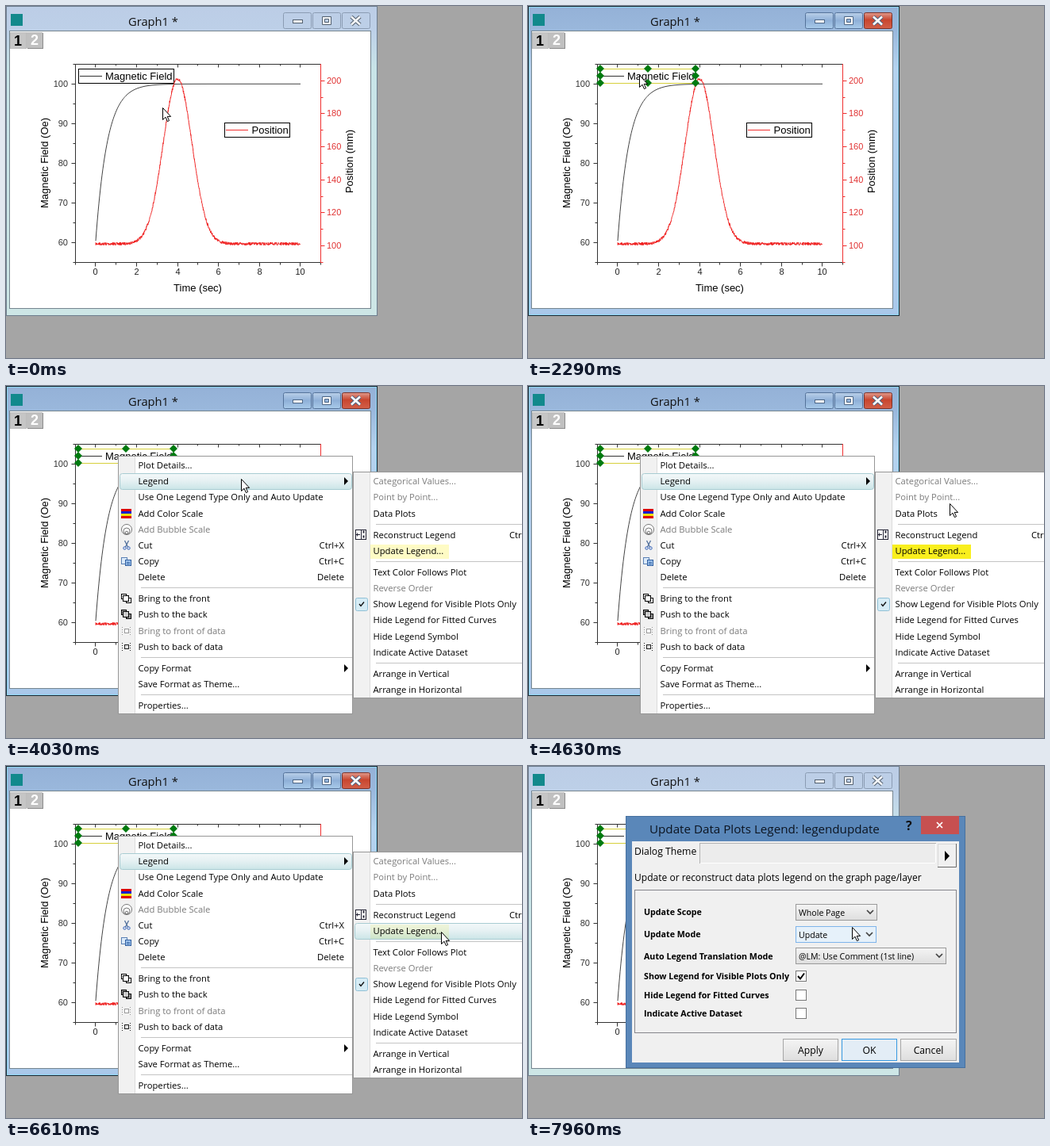
Animation of 650 by 444 pixels, one loop 7990 ms. Source, as an HTML page:

```html
<!DOCTYPE html>
<html lang="en">
<head>
<meta charset="utf-8">
<title>Updating a graph legend</title>
<style>
  html, body { margin: 0; width: 100%; height: 100%; overflow: hidden; background: #a5a5a5; }
  svg { display: block; width: 650px; height: 444px; }
  text { font-family: "Open Sans", "Noto Sans", sans-serif; font-size: 11.25px; white-space: pre; }
  .plot text { font-family: "Liberation Sans", Arial, sans-serif; font-size: 13px; }
  .plot .tick { font-size: 11px; }
  .plot .tab { font-size: 18px; font-weight: bold; }
  .bold { font-size: 10.7px; font-weight: 700; }
  .combo { font-size: 10.6px; }
  .button { font-size: 12.2px; }
  .mid { text-anchor: middle; }
  .end { text-anchor: end; }
  #mark { mix-blend-mode: multiply; }
</style>
</head>
<body>
<svg id="stage" viewBox="0 0 650 444" xmlns="http://www.w3.org/2000/svg">
  <defs>
    <linearGradient id="idle" x2="0" y2="1">
      <stop offset="0" stop-color="#bccde6"/><stop offset=".08" stop-color="#bdd0e8"/>
      <stop offset=".2" stop-color="#c8e4e8"/><stop offset="1" stop-color="#cde6e6"/>
    </linearGradient>
    <linearGradient id="active" x2="0" y2="1">
      <stop offset="0" stop-color="#94b1d7"/><stop offset=".08" stop-color="#9ab8dc"/>
      <stop offset=".2" stop-color="#b4d2ee"/><stop offset="1" stop-color="#a9c8ea"/>
    </linearGradient>
    <linearGradient id="blueButton" x2="0" y2="1">
      <stop offset="0" stop-color="#b9cfe8"/><stop offset=".5" stop-color="#8fb0d8"/><stop offset="1" stop-color="#a9cbea"/>
    </linearGradient>
    <linearGradient id="redButton" x2="0" y2="1">
      <stop offset="0" stop-color="#e09a8c"/><stop offset=".45" stop-color="#c9462f"/><stop offset="1" stop-color="#d2604a"/>
    </linearGradient>
    <linearGradient id="hover" x2="0" y2="1">
      <stop offset="0" stop-color="#f3f8f9"/><stop offset=".45" stop-color="#e6f1f3"/><stop offset="1" stop-color="#cbe5e7"/>
    </linearGradient>
    <linearGradient id="face" x2="0" y2="1">
      <stop offset="0" stop-color="#f4f4f4"/><stop offset="1" stop-color="#dedede"/>
    </linearGradient>
  </defs>
</svg>
<script>
const LOOP = 7990;
const stage = document.getElementById('stage');
const $ = id => document.getElementById(id);

const rect = (x, y, w, h, fill, stroke = 'none', more = '') =>
  `<rect x="${x}" y="${y}" width="${w}" height="${h}" fill="${fill}" stroke="${stroke}" ${more}/>`;
// Box with a crisp one pixel border; x, y, w, h are outer sizes
const box = (x, y, w, h, fill, stroke, more) => rect(x + .5, y + .5, w - 1, h - 1, fill, stroke, more);
const path = (d, stroke, fill = 'none', more = '') =>
  `<path d="${d}" stroke="${stroke}" fill="${fill}" ${more}/>`;
const ring = (x, y, r, stroke, fill = 'none') =>
  `<circle cx="${x}" cy="${y}" r="${r}" fill="${fill}" stroke="${stroke}"/>`;
const text = (x, y, s, cls = '', fill = '#000', more = '') =>
  `<text x="${x}" y="${y}" class="${cls}" fill="${fill}" ${more}>${s}</text>`;
const group = (id, body, more = '') => `<g id="${id}" ${more}>${body}</g>`;

function chrome(on) {
  const glyph = on ? '#fff' : '#f4f6f8', edge = on ? '#4d6685' : '#53606f';
  const button = x => box(x, 8, 36, 21, on ? 'url(#blueButton)' : 'none', on ? '#55739a' : '#8b9cb3', 'rx="2"');
  const cross = 'M435 13.5l11 10M446 13.5l-11 10';
  return box(0, 0, 468, 391, `url(#${on ? 'active' : 'idle'})`, on ? '#1c2630' : '#6d7d8e')
    + (on ? box(1, 1, 466, 389, 'none', '#8fd8f4') : '')
    + rect(6, 10, 15, 15, '#12898c')
    + text(154, 25, 'Graph1 *', '', '#111', 'style="font-size:14.7px"')
    + button(349) + button(386)
    + box(423, 8, 36, 21, on ? 'url(#redButton)' : 'none', on ? '#7c3128' : '#8b9cb3', 'rx="2"')
    + rect(361.5, 17.5, 12, 4, glyph, edge)
    + path('M398.5 13.5h11v10h-11zM401.5 16.5h5v4h-5z', edge, glyph, 'fill-rule="evenodd"')
    + path(cross, edge, 'none', 'stroke-width="4.6"') + path(cross, glyph, 'none', 'stroke-width="2.6"')
    + box(4, 31, 456, 351, '#fff', '#75858f');
}

function curves() {
  let seed = 7;
  const noise = () => (seed = seed * 16807 % 2147483647) / 2147483647 * 3.6 - 1.8;
  const sample = (step, f) => {
    let d = '';
    for (let x = 0; x <= 258; x += step) d += `${d ? 'L' : 'M'}${(113 + x).toFixed(2)} ${f(x / 25.8).toFixed(2)}`;
    return d;
  };
  return path(sample(1, t => 98.3 + 198 * Math.exp(-t / .57)), '#444')
    + path(sample(.258, t => 300 - 208 * Math.exp(-((t - 4) ** 2)) + noise()), '#f02020');
}

function axes() {
  let dark = 'M87.5 323.5V73.5H396.5M87.5 323.5H396.5', red = 'M396.5 73V324', out = '';
  for (let i = 0; i <= 12; i++) {
    const x = Math.floor(87 + i * 25.8) + .5, major = i % 2;
    dark += `M${x} 323.5v${major ? 5 : 3}M${x} 73.5v${major ? 4 : 2}`;
    if (major) out += text(x, 339, i - 1, 'tick mid', '#222');
  }
  for (let i = 0; i <= 10; i++) {
    const y = 73.5 + i * 25;
    dark += `M87.5 ${y}h${i % 2 ? -5 : -3}`;
    if (i % 2) out += text(78, y + 3.5, 105 - i * 5, 'tick end', '#333');
  }
  for (let i = 0; i <= 11; i++) {
    const y = Math.round(302 - (i - 1) * 20.83) + .5, major = i % 2;
    red += `M396.5 ${y}h${major ? 5 : 3}`;
    if (major) out += text(404, y + 3.5, 90 + i * 10, 'tick', '#e03030');
  }
  return path(dark, '#333') + path(red, '#f03030') + out;
}

function plot() {
  const diamond = (x, y) => path(`M${x - 5} ${y}l5 -5l5 5l-5 5z`, 'none', '#007a10');
  const spots = [91, 151, 211].flatMap(x => [79, 88, 97].map(y => [x, y])).filter(p => p[0] != 151 || p[1] != 88);
  return box(5, 33, 21, 21, '#c6c6c6', '#bdbdbd') + text(10, 50, 1, 'tab')
    + rect(27, 34, 20, 20, '#8c8c8c') + rect(26, 33, 20, 20, '#c0c0c0') + text(31, 49, 2, 'tab', '#fff')
    + axes()
    + text(0, 0, 'Magnetic Field (Oe)', 'mid', '#000', 'transform="translate(52.5 198) rotate(-90)"')
    + text(0, 0, 'Position (mm)', 'mid', '#000', 'transform="translate(436.5 196) rotate(-90)"')
    + text(241.5, 360, 'Time (sec)', 'mid')
    + box(91, 79, 121, 19, '#fff', '#000', 'id="frame"')
    + box(275, 147, 83, 19, '#fff', '#000')
    + curves()
    + path('M93 88.5H121', '#333') + text(125, 92.5, 'Magnetic Field')
    + path('M277 156.5H305', '#f03030') + text(309.5, 160.5, 'Position')
    + group('handles', path('M91 79.5H212M91 97.5H212', '#d6d03c')
      + spots.map(p => diamond(...p)).join(''));
}

const GREY = '#7b7b7b';
// Rows: centre y, label, shortcut, disabled
const mainRows = [
  [100, 'Plot Details...'], [120, 'Legend', '>'], [140, 'Use One Legend Type Only and Auto Update'],
  [161, 'Add Color Scale'], [181, 'Add Bubble Scale', '', 1], [201, 'Cut', 'Ctrl+X'],
  [221, 'Copy', 'Ctrl+C'], [241, 'Delete', 'Delete'], [268, 'Bring to the front'],
  [288, 'Push to the back'], [309, 'Bring to front of data', '', 1], [329, 'Push to back of data'],
  [356, 'Copy Format', '>'], [376, 'Save Format as Theme...'], [403, 'Properties...']
];
const subRows = [
  [120, 'Categorical Values...', '', 1], [140, 'Point by Point...', '', 1], [161, 'Data Plots'],
  [188, 'Reconstruct Legend'], [208, 'Update Legend...'], [235, 'Text Color Follows Plot'],
  [255, 'Reverse Order', '', 1], [275, 'Show Legend for Visible Plots Only'],
  [295, 'Hide Legend for Fitted Curves'], [316, 'Hide Legend Symbol'],
  [336, 'Indicate Active Dataset'], [363, 'Arrange in Vertical'], [383, 'Arrange in Horizontal']
];

function menu(id, x, y, w, h, rows, lines, extra) {
  const tip = (s, cy) => s == '>'
    ? path(`M${x + 285} ${cy - 5}v10l5 -5z`, 'none', '#000')
    : text(x + 285, cy + 4, s || '', 'end');
  return group(id, box(x, y, w, h, '#fff', '#979797')
    + rect(x + 1, y + 1, 20, h - 2, '#f1f1f1') + path(`M${x + 21.5} ${y + 1}v${h - 2}`, '#dcdcdc')
    + lines.map(v => path(`M${x + 29} ${v + .5}H${x + w - 1}`, '#c4c4c4')).join('')
    + box(x + 2, 0, w - 3, 21, 'url(#hover)', '#a8ccd2', `id="${id}Hover" rx="3"`)
    + extra
    + rows.map(([cy, s, key, off]) => text(x + 25.5, cy + 4, s, '', off ? GREY : '#000') + tip(key, cy)).join(''));
}

function icons() {
  const stripes = ['#e00000', '#1020d0', '#f0e000', '#e00000'];
  const stack = (y, outer, inner) => box(145, y - 6, 7, 7, outer, '#000') + box(151, y - 1, 7, 7, outer, '#000')
    + box(147, y - 4, 8, 8, inner, '#000');
  const dotted = (y, c, fill) => path(`M146.5 ${y - 5}v11M156.5 ${y - 5}v11`, c, 'none', 'stroke-dasharray="1 2"')
    + box(149, y - 3, 6, 6, fill, c);
  return stripes.map((c, i) => rect(145, 155 + i * 3, 13, 3, c)).join('')
    + ring(152, 181, 6.5, '#777', '#fff') + ring(152, 183, 4, '#777') + ring(152, 185, 1.8, '#777')
    + path('M149.5 195l4 8M154.5 195l-4 8', '#52709c', 'none', 'stroke-width="1.3"')
    + ring(149.5, 204.5, 1.7, '#2458b8') + ring(154.5, 204.5, 1.7, '#2458b8')
    + box(145, 216, 8, 9, '#dcebfa', '#5a80b4') + box(150, 219, 8, 8, '#9fc4ee', '#315f9f')
    + path('M152 222.5h4M152 224.5h4', '#315f9f')
    + stack(268, '#fff', '#fff') + stack(288, '#999', '#ccc')
    + dotted(309, '#999', '#fff') + dotted(329, '#222', '#ddd');
}

const subExtra = box(440, 181, 14, 13, '#fff', '#223') + path('M447.5 181v13M441 187.5h5M442.5 185.5v4', '#223')
  + path('M449.5 184h2M449.5 190h2', '#223', 'none', 'stroke-width="3"')
  + box(440, 267, 16, 17, '#d6ecf5', '#8fc0d6', 'rx="2"')
  + path('M445 275l2 2.5l4 -5', '#111', 'none', 'stroke-width="1.4"')
  + text(634, 192, 'Ctrl+L');

function dialog() {
  const label = (y, s) => text(146, y + 4, s, 'bold');
  const combo = (y, w, s, id = '') => box(337, y, w, 21, 'url(#face)', '#9a9a9a', id)
    + text(341, y + 14.5, s, 'combo')
    + path(`M${337 + w - 13} ${y + 8}l4 4l4 -4`, '#444', 'none', 'stroke-width="1.7"');
  const check = (y, on) => box(337, y - 7, 14, 14, '#fff', '#777')
    + (on ? path(`M340 ${y}l3 3.5l5 -7`, '#000', 'none', 'stroke-width="2"') : '');
  const button = (x, w, s, main) => box(x, 344, w, 28, main ? '#e3edf6' : 'url(#face)', main ? '#3899e0' : '#a6a6a6')
    + text(x + w / 2, 362.5, s, 'button mid');
  return group('dialog', box(123, 63, 428, 318, '#5a87b9', '#47719f')
    + text(153, 85, 'Update Data Plots Legend: legendupdate', '', '#0c1420', 'style="font-size:15.2px"')
    + text(476, 81, '?', '', '#111', 'style="font-size:16px;font-weight:700"')
    + rect(495, 63, 48, 23, '#c75050') + path('M515 71l7 7M522 71l-7 7', '#fff', 'none', 'stroke-width="1.7"')
    + rect(131, 95, 412, 279, '#f0f0f0')
    + text(134, 112, 'Dialog Theme', '', '#000', 'style="font-size:12.2px"')
    + box(216, 97, 298, 26, '#ececec', '#b4b4b4') + path('M217 122.5H513.5V98', '#fff')
    + box(516, 98, 24, 30, '#f0f0f0', '#d8d8d8') + path('M516 127.5H539.5V98', '#6a6a6a')
    + path('M525 107v13l6 -6.5z', 'none', '#000')
    + text(134, 145, 'Update or reconstruct data plots legend on the graph page/layer', '', '#000', 'style="font-size:12.05px"')
    + box(134, 156, 406, 181, '#f0f0f0', '#85858b')
    + label(184, 'Update Scope') + label(212, 'Update Mode') + label(240, 'Auto Legend Translation Mode')
    + label(265, 'Show Legend for Visible Plots Only') + label(289, 'Hide Legend for Fitted Curves')
    + label(312, 'Indicate Active Dataset')
    + combo(174, 103, 'Whole Page') + combo(202, 102, 'Update', 'id="mode"')
    + combo(229, 190, '@LM: Use Comment (1st line)')
    + check(265, true) + check(289) + check(312)
    + button(321, 70, 'Apply') + button(395, 70, 'OK', true) + button(469, 71, 'Cancel'));
}

stage.insertAdjacentHTML('beforeend', rect(0, 0, 650, 444, '#a5a5a5')
  + group('idleWindow', chrome(false)) + group('activeWindow', chrome(true))
  + group('plot', plot(), 'class="plot"')
  + menu('main', 141, 88, 296, 326, mainRows, [254, 342, 389], icons())
  + menu('sub', 437, 108, 240, 286, subRows, [174, 221, 349], subExtra)
  + rect(459, 200, 99, 18, '#f9ef1e', 'none', 'id="mark"')
  + dialog()
  + group('cursor', path('M.5 .5V15.5L4 12.2L6.4 17.6L8.6 16.6L6.2 11.4H10.6Z', '#000', '#fff')));

// Pointer track: time, x, y
const track = [
  [0, 197, 128], [180, 189, 122], [810, 189, 121], [1100, 178, 103], [1440, 159, 89], [1620, 150, 87],
  [1650, 150, 87], [1930, 140, 87], [2860, 140, 87], [3320, 181, 113], [3820, 181, 113],
  [4260, 420, 122], [4630, 531, 148], [5390, 547, 208], [5520, 547, 208], [5550, 548, 209],
  [6730, 548, 209], [6760, 546, 208], [7120, 546, 208], [7150, 545, 207], [7280, 546, 207],
  [7410, 546, 207], [7680, 480, 198], [7960, 408, 203], [LOOP, 408, 203]
];

function pointer(t) {
  const i = track.findIndex(p => p[0] > t), [t0, x0, y0] = track[i - 1], [t1, x1, y1] = track[i];
  const k = (t - t0) / (t1 - t0);
  return [Math.round(x0 + (x1 - x0) * k), Math.round(y0 + (y1 - y0) * k)];
}

const show = (id, on) => $(id).style.display = on ? '' : 'none';
const ramp = (t, a, b) => Math.min(1, Math.max(0, (t - a) / (b - a)));

function hover(id, rows, y) {
  const row = y !== null && rows.find(r => !r[3] && Math.abs(y + .5 - r[0]) < 10.5);
  show(id, row);
  if (row) $(id).setAttribute('y', row[0] - 9.5);
}

function render(t) {
  const [x, y] = pointer(t);
  const active = t >= 2090 && t < 6760, subOpen = t >= 3620 && t < 6730;
  $('cursor').setAttribute('transform', `translate(${x} ${y})`);
  show('idleWindow', !active);
  show('activeWindow', active);
  show('handles', t >= 2290);
  show('frame', t < 2290);
  show('main', t >= 2490 && t < 6760);
  show('sub', subOpen);
  hover('mainHover', mainRows, t >= 3320 ? 120 : x > 141 ? y : null);
  hover('subHover', subRows, x > 438 ? y : null);
  $('mark').setAttribute('opacity', ramp(t, 3820, 4630) - ramp(t, 5920, 6730));
  show('dialog', t >= 6760);
  $('dialog').setAttribute('opacity', ramp(t, 6720, 6950));
  const over = t >= 7440 && x < 438 && y >= 201;
  $('mode').setAttribute('fill', over ? '#e6f1fa' : 'url(#face)');
  $('mode').setAttribute('stroke', over ? '#7eb4ea' : '#9a9a9a');
}

const start = performance.now();
function tick() {
  render((performance.now() - start) % LOOP);
  requestAnimationFrame(tick);
}
render(0);
requestAnimationFrame(tick);
</script>
</body>
</html>
```
